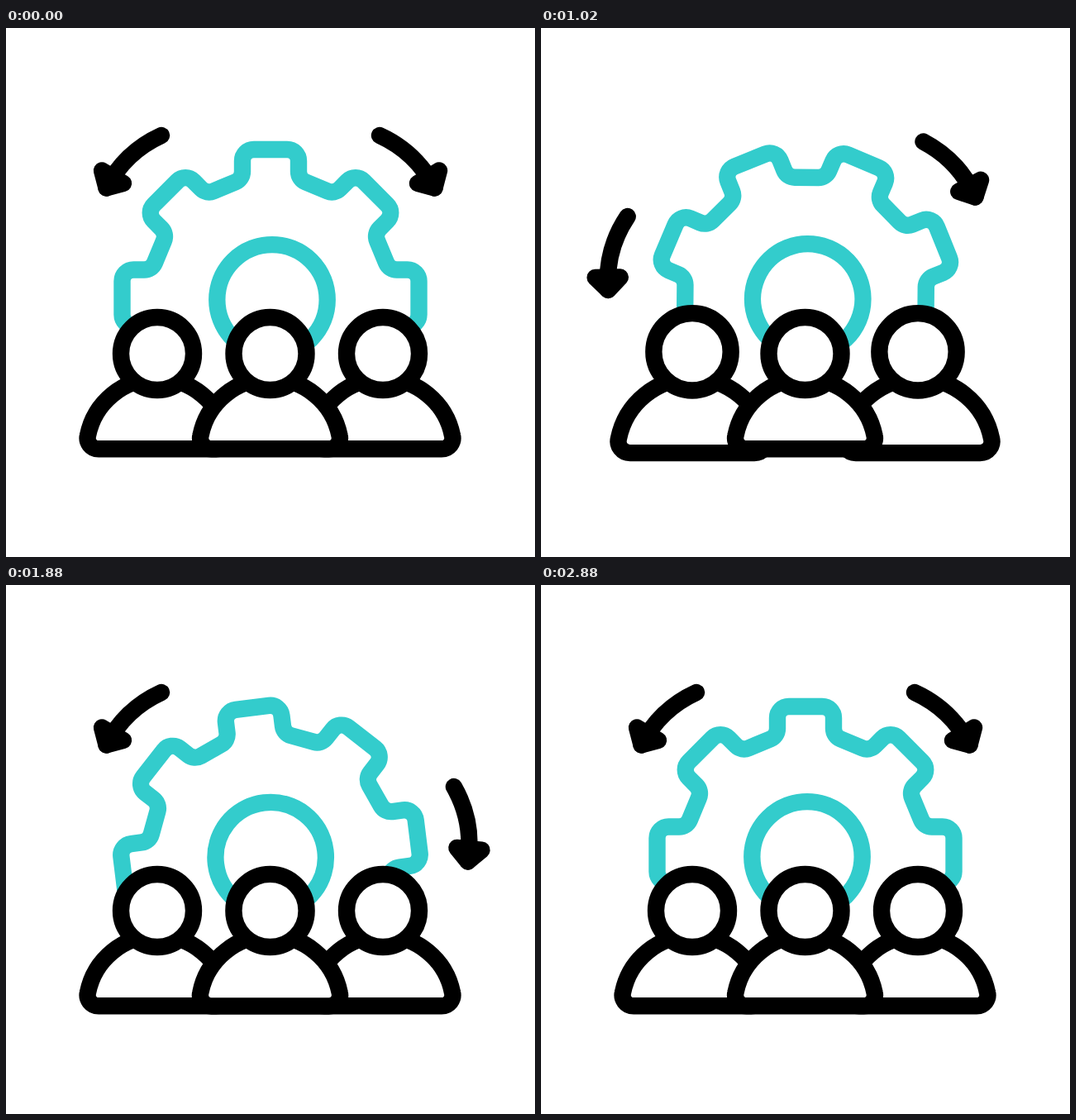
Write an HTML page that moves like this. It is 640 by 640 pixels and loops after 2.98 s.

```html
<!DOCTYPE html>
<html lang="en">
<head>
<meta charset="utf-8">
<title>Team gear</title>
<style>
  html, body { margin: 0; width: 100%; height: 100%; overflow: hidden; background: #fff; }
  svg { display: block; width: 100vw; height: 100vh; }
  .line { stroke-width: 20.4px; stroke-linecap: round; stroke-linejoin: round; }
  .teal { stroke: #33cccc; fill: none; }
  .black { stroke: #000; }
</style>
</head>
<body>
<svg viewBox="0 0 640 640">
  <defs>
    <g id="arrow" class="line black">
      <path d="M188 130A140 140 0 0 0 121.5 193.5" fill="none"/>
      <path d="M116 172.5L121.5 193.5L142 188Z"/>
    </g>
    <g id="person" fill="#fff">
      <path d="M-71 509.3C-80 509.3 -86 501 -84 493A85.65 85.65 0 0 1 84 493C86 501 80 509.3 71 509.3Z"/>
      <circle cy="394" r="44"/>
    </g>
    <clipPath id="upper"><rect width="640" height="405"/></clipPath>
  </defs>
  <g id="sparks" class="line teal"></g>
  <g clip-path="url(#upper)">
    <g id="gear" class="line teal">
      <path id="teeth"/>
      <circle cx="322" cy="328.8" r="66.7"/>
    </g>
  </g>
  <use id="arrowL" href="#arrow"/>
  <g id="arrowR"><use href="#arrow" transform="matrix(-1 0 0 1 640 0)"/></g>
  <use id="left" class="line black" href="#person"/>
  <use id="right" class="line black" href="#person"/>
  <use id="mid" class="line black" href="#person"/>
</svg>
<script>
const LOOP = 2980, CX = 320, CY = 326.5, STROKE = 20.4;
const el = id => document.getElementById(id);

// Value at time t along [time, value] keys, with cosine easing between them.
function track(t, keys) {
  if (t <= keys[0][0]) return keys[0][1];
  for (let i = 1; i < keys.length; i++) {
    const [t0, a] = keys[i - 1], [t1, b] = keys[i];
    if (t < t1) return a + (b - a) * (1 - Math.cos(Math.PI * (t - t0) / (t1 - t0))) / 2;
  }
  return keys[keys.length - 1][1];
}

const bump = (start, peak, end, size) => [[start, 0], [peak, size], [end, 0]];
const ramp = (t, a, b) => Math.min(1, Math.max(0, (t - a) / (b - a)));

// Closed polygon with circular corners.
function rounded(pts, r) {
  const n = pts.length;
  let d = '';
  pts.forEach(([x, y], i) => {
    const unit = ([px, py]) => {
      const l = Math.hypot(px - x, py - y);
      return [(px - x) / l, (py - y) / l];
    };
    const u = unit(pts[(i + n - 1) % n]), v = unit(pts[(i + 1) % n]);
    const turn = Math.PI - Math.acos(u[0] * v[0] + u[1] * v[1]);
    const cut = r * Math.tan(turn / 2);
    const sweep = u[0] * v[1] - u[1] * v[0] < 0 ? 1 : 0;
    d += `${i ? 'L' : 'M'}${x + u[0] * cut} ${y + u[1] * cut}` +
         `A${r} ${r} 0 0 ${sweep} ${x + v[0] * cut} ${y + v[1] * cut}`;
  });
  return d + 'Z';
}

function gearPath() {
  const tooth = [[-34, -143.6], [-34, -179.5], [34, -179.5], [34, -143.6]];
  const pts = [];
  for (let k = 0; k < 8; k++) {
    const a = k * Math.PI / 4, c = Math.cos(a), s = Math.sin(a);
    for (const [x, y] of tooth) pts.push([CX + x * c - y * s, CY + x * s + y * c]);
  }
  return rounded(pts, 13.8);
}
el('teeth').setAttribute('d', gearPath());

// Rays: base, reach, and the times they begin and finish growing.
const rays = [
  { x: 272, y: 121.5, dx: -9, dy: -22, on: 2435, full: 2600 },
  { x: 316, y: 117, dx: -2.6, dy: -38.5, on: 2380, full: 2560 },
  { x: 361, y: 118, dx: 9, dy: -22, on: 2435, full: 2600 }
];
for (const ray of rays) {
  ray.node = document.createElementNS('http://www.w3.org/2000/svg', 'path');
  el('sparks').append(ray.node);
}

const gearKeys = [[200, 0], [670, -43.5], [1730, 43.5], [2380, 0]];
const arrowLKeys = bump(240, 900, 1560, -34.3);
const arrowRKeys = bump(865, 1740, 2360, 40.7);
const people = [
  { id: 'left', x: 183, keys: bump(200, 750, 1240, 0.145) },
  { id: 'right', x: 456, keys: bump(780, 1320, 1860, 0.145) },
  { id: 'mid', x: 319.5, keys: bump(1840, 2380, 2880, 0.145) }
];

function spin(id, angle) {
  el(id).setAttribute('transform', `rotate(${angle} ${CX} ${CY})`);
}

function draw(t) {
  spin('gear', track(t, gearKeys));
  spin('arrowL', track(t, arrowLKeys));
  spin('arrowR', track(t, arrowRKeys));
  for (const { id, x, keys } of people) {
    const s = 1 + track(t, keys);
    el(id).setAttribute('transform', `translate(${x} 430) scale(${s}) translate(0 -430)`);
    el(id).style.strokeWidth = `${STROKE / s}px`; // line weight stays constant
  }
  for (const { x, y, dx, dy, on, full, node } of rays) {
    const a = ramp(t, 2600, 2800), b = ramp(t, on, full);
    const shown = t >= on && t < 2800;
    node.setAttribute('d', shown ? `M${x + dx * a} ${y + dy * a}L${x + dx * b} ${y + dy * b}` : '');
  }
}

function tick() {
  draw(performance.now() % LOOP);
  requestAnimationFrame(tick);
}
tick();
</script>
</body>
</html>
```
